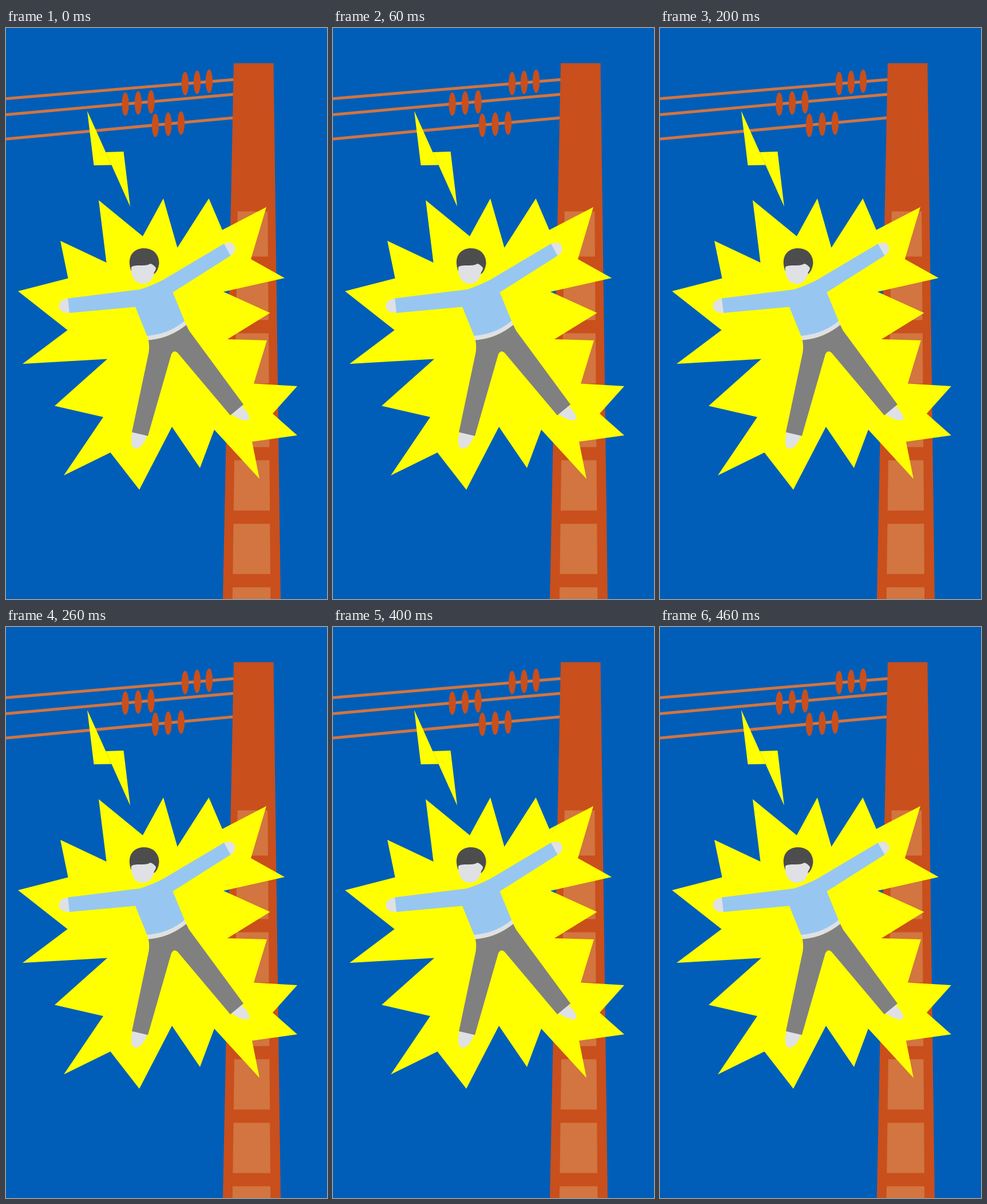
Animation of 561x998 px, one loop 500 ms. Source, as an HTML page:

```html
<!DOCTYPE html>
<html lang="en">
<head>
<meta charset="utf-8">
<title>Electric shock</title>
<style>
  html, body { margin: 0; width: 100%; height: 100%; overflow: hidden; background: #005eb8; }
  svg { display: block; width: 100%; height: 100%; }
  .steel { fill: #c94f1c; }
  .pane { fill: #d27540; }
  .wire { fill: none; stroke: #d27540; stroke-width: 5; }
  .skin { fill: #dfe1e5; }
  .flash { fill: #ff0; stroke: none; stroke-width: 8; stroke-miterlimit: 20; }
  .outline .flash { fill: none; stroke: #ff0; }
  .seam { stroke: #c8cf20; stroke-width: .6; }
  .outline .seam { display: none; }
</style>
</head>
<body>
<svg id="scene" viewBox="0 0 561 998">
  <path class="wire" d="M0 123.5L400 90M0 151.5L400 115.7M0 194L400 156.7"/>
  <g id="insulators" class="steel"></g>
  <path class="steel" d="M398 61.5H467.5L480 998H379Z"/>
  <path class="pane" d="M404.7 320.5H457.3L462.3 998H395.8Z"/>
  <g id="bars" class="steel"></g>

  <polygon class="flash" points="142,145 174.3,217 205.5,216 217,312 184.5,239.5 153.5,240"/>
  <path class="seam" d="M174.3 217L184.5 239.5"/>
  <polygon class="flash" points="162,301 239,364 275,298 299.5,384 354.5,298 378,353 455,313 428,404
    487,437 380,461 461.5,498 387,544 456,546 433,621.5 509,626 466,674 509,712 430,723 443,788
    364,702 339,769 290,697 233,807 182.5,742 101,782 170,680 85,660.5 177,578.5 29,587
    107.5,528 21,460 108.5,437.5 95,372 175.5,410"/>

  <path fill="#4d4d4d" d="M219 425C210 402 221 385 241 385C259 385 268 398 267.500 412Q266 424 259 430Z"/>
  <g class="skin">
    <path d="M219 418C225 412 243 418 252 412Q255 411.500 262 419C262 425 258 425 258.500 431C254 443 248 447 239 447C228 447 218 438 219 418Z"/>
    <path d="M112 473L114 498Q92 499 92.500 485Q94 473 112 473Z"/>
    <path d="M378 379C389 373 396 374 400 382C402 390 398 396 388 400Z"/>
    <path d="M221 704L247 710Q240 734 226 735.500Q218 734 219 718Z"/>
    <path d="M393 674L410 659Q426 674 425.500 683C422 688 411 687 393 674Z"/>
    <path d="M246 536L249 545.500Q285 543 315.500 519L311 511Z"/>
  </g>
  <path fill="#97c7f0" d="M108 472.500L234 457Q256 450 275 440L381 377L392.500 398L291.500 462L312 512Q285 535 246.500 538L226 487.500L111 498Z"/>
  <path fill="#808080" d="M249 545.500Q285 543 315 519L320 529L415 658L392 677L301 569Q294 561 289 570L248 713L220 706.500L249.500 567Q251 556 249 545.500Z"/>
</svg>
<script>
  const scene = document.getElementById('scene');

  function add(parentId, tag, attributes) {
    const node = document.createElementNS('http://www.w3.org/2000/svg', tag);
    for (const name in attributes) node.setAttribute(name, attributes[name]);
    document.getElementById(parentId).append(node);
  }

  for (const [x, y] of [[313, 97], [208.5, 133], [261, 170]]) {
    for (let i = 0; i < 3; i++) {
      add('insulators', 'ellipse', { cx: x + i * 22.5 - (y < 100 ? i * 1.5 : 0), cy: y - i * 2, rx: 6.2, ry: 20.5 });
    }
  }
  for (let y = 399.5; y < 998; y += 111) {
    add('bars', 'rect', { x: 393, y, width: 75, height: 23 });
  }

  const STEP = 100, STEPS = 5;
  let start;
  function draw(now) {
    start ??= now;
    const step = Math.floor((now - start) / STEP) % STEPS;
    scene.classList.toggle('outline', step % 2 === 1);
    requestAnimationFrame(draw);
  }
  requestAnimationFrame(draw);
</script>
</body>
</html>
```
